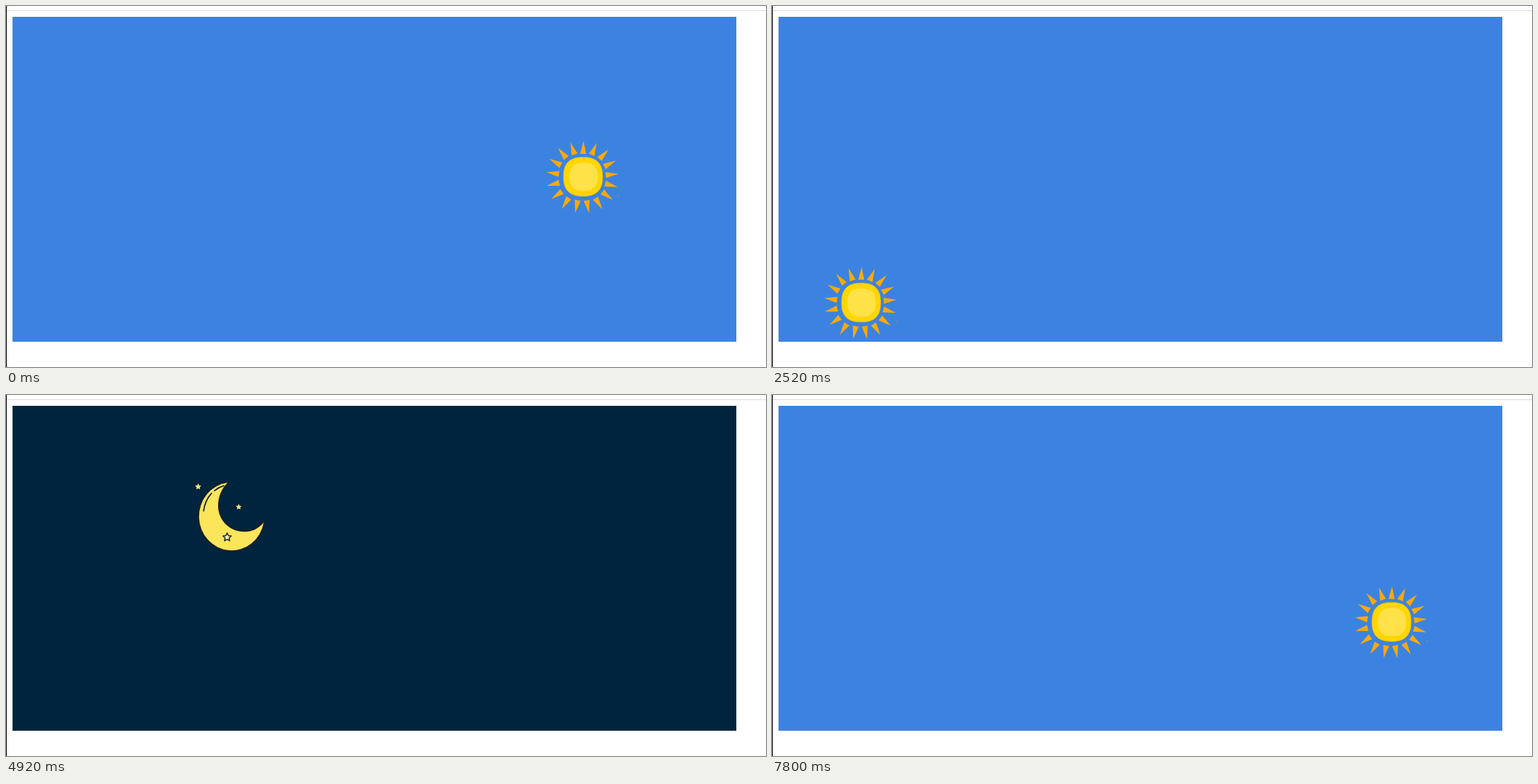
Animation, 1050 px wide and 500 px high, one loop 7.83 s. Source, as an HTML page with a canvas:

```html
<!DOCTYPE html>
<html lang="en">
<head>
<meta charset="utf-8">
<title>Day and night</title>
<style>
  html, body { margin: 0; width: 100%; height: 100%; overflow: hidden; background: #fff; }
  canvas { display: block; }
</style>
</head>
<body>
<canvas id="stage" width="1050" height="500"></canvas>
<script>
const ctx = document.getElementById('stage').getContext('2d');

const LOOP = 7830, TICK = 30;
const SKY = { x: 9, y: 15, w: 1000, h: 450, day: '#3c83e1', night: '#00243d' };
const ORBIT = { x: 459, y: 465, r: 400 };
const START = 136.25, STEP = 76 / 27, DAWN = 360, DAWN_SKIP = 2;
const RAD = Math.PI / 180;

const CRESCENT = new Path2D(
  'M47 3 A45 47 0 1 0 97 58 C90 67 80 71 71 71 C50 71 34 55 34 35 C34 22 39 11 47 3 Z');
const GLINTS = new Path2D('M14 42 Q16 27 25 17.5 M29 14 Q35 9 42 7');

// Closed path through points given by polar angle (clockwise from the top) and radius
function polar(cx, cy, count, radius) {
  const path = new Path2D();
  for (let i = 0; i < count; i++) {
    const a = i * 2 * Math.PI / count, r = radius(a, i);
    path.lineTo(cx + r * Math.sin(a), cy - r * Math.cos(a));
  }
  path.closePath();
  return path;
}

// Slightly bulging towards the diagonals
const square = (r, amount) => a => r - amount * Math.cos(4 * a);
const blob = (cx, cy, r) => polar(cx, cy, 72, square(r, r * 0.035));
const star = (cx, cy, r) => polar(cx, cy, 10, (a, i) => i % 2 ? r * 0.48 : r);

function rays(count) {
  const path = new Path2D();
  const tip = square(51.3, 1.4), base = square(33.5, 1.2);
  for (let i = 0; i < count; i++) {
    const even = i * 2 * Math.PI / count;
    const a = even + RAD * (1.2 + 1.6 * Math.cos(even - 300 * RAD));
    const sin = Math.sin(a), cos = Math.cos(a);
    const add = (r, side) => path.lineTo(49.5 + r * sin + side * cos, 50 - r * cos + side * sin);
    path.moveTo(49.5 + tip(a) * sin, 50 - tip(a) * cos);
    add(base(a), 4.2);
    add(base(a), -4.2);
    path.closePath();
  }
  return path;
}

function fill(path, color) {
  ctx.fillStyle = color;
  ctx.fill(path);
}

function stroke(path, color, width) {
  ctx.strokeStyle = color;
  ctx.lineWidth = width;
  ctx.stroke(path);
}

function box(x, y, w, h, color) {
  ctx.fillStyle = color;
  ctx.fillRect(x, y, w, h);
}

const sunRays = rays(17), sunBody = blob(50.5, 49.3, 28), sunCore = blob(51.2, 49.5, 20.3);
const bigStar = star(46.5, 78.5, 6);
const smallStars = [star(6.5, 8.5, 4.6), star(62.5, 36.5, 4.3)];

function drawSun() {
  fill(sunRays, '#ffa900');
  fill(sunBody, '#ffd600');
  stroke(sunBody, '#f2b705', 0.8);
  fill(sunCore, '#ffe148');
  box(99, 75, 1, 1, '#d99a2b');
}

function drawMoon() {
  stroke(CRESCENT, '#2b1d1f', 2.6);
  fill(CRESCENT, '#fae55b');
  stroke(GLINTS, '#12262f', 1.7);
  fill(bigStar, '#fff4b8');
  stroke(bigStar, '#16262e', 1.5);
  smallStars.forEach(s => fill(s, '#fbe675'));
}

// Total degrees travelled; the pace skips a little at the first dawn
function degreesAt(tick) {
  const d = START + STEP * tick;
  return Math.round(d < DAWN ? d : d + DAWN_SKIP);
}

function draw(ms) {
  const total = degreesAt(Math.floor((ms % LOOP) / TICK));
  const isDay = Math.floor(total / 180) % 2 === 0;
  const angle = (total % 180) * RAD;

  box(0, 0, 1050, 500, '#fff');
  box(0, 6, 1050, 1, '#dadada');
  box(0, 0, 1, 500, '#000');

  ctx.save();
  ctx.beginPath();
  ctx.rect(SKY.x, SKY.y, SKY.w, SKY.h);
  ctx.clip();
  box(SKY.x, SKY.y, SKY.w, SKY.h, isDay ? SKY.day : SKY.night);
  ctx.translate(ORBIT.x - ORBIT.r * Math.cos(angle), ORBIT.y - ORBIT.r * Math.sin(angle));
  ctx.lineCap = ctx.lineJoin = 'round';
  isDay ? drawSun() : drawMoon();
  ctx.restore();
}

const start = performance.now();
function frame() {
  draw(performance.now() - start);
  requestAnimationFrame(frame);
}
frame();
</script>
</body>
</html>
```
